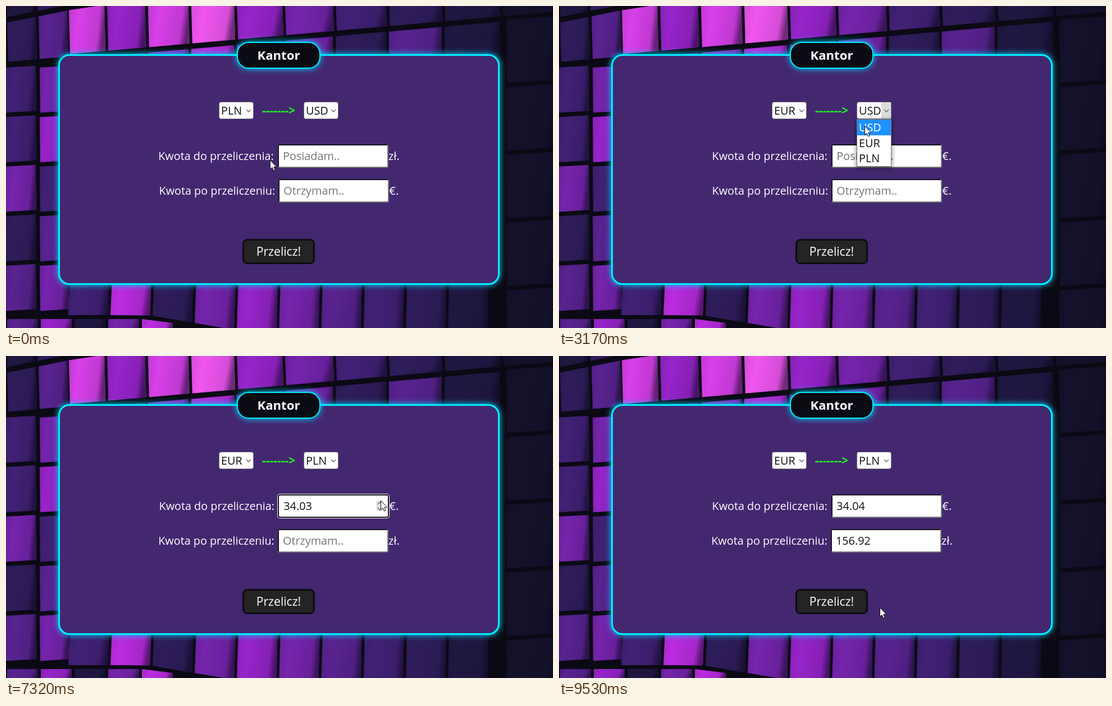
These frames come from a looping animation (974x575 px, 9.89 s). An HTML page:

```html
<!DOCTYPE html>
<html lang="pl">
<head>
<meta charset="utf-8">
<title>Kantor</title>
<style>
  html, body { margin: 0; width: 100%; height: 100%; overflow: hidden; background: #0b0a14; }
  svg { display: block; width: 974px; height: 575px; }
  text { font: 19.8px "Open Sans", "Noto Sans", sans-serif; white-space: pre; }
  .big { font-size: 21.2px; text-anchor: middle; }
  .title { font-size: 22.2px; font-weight: 700; text-anchor: middle; }
  .arrow { font-size: 21px; font-weight: 700; }
  .glow { filter: drop-shadow(0 0 6px #00d8ff); }
  .list { filter: drop-shadow(0 2px 4px #0008); }
</style>
</head>
<body>
<svg viewBox="0 0 974 575">
  <linearGradient id="shade" x2="1" y2=".15">
    <stop offset="0" stop-color="#0a061c" stop-opacity=".12"/>
    <stop offset=".3" stop-color="#0a061c" stop-opacity="0"/>
    <stop offset=".85" stop-color="#0a061c" stop-opacity=".12"/>
    <stop offset="1" stop-color="#0a061c" stop-opacity=".55"/>
  </linearGradient>
  <g id="wall"></g>
  <rect class="glow" x="94.5" y="87.5" width="783" height="409" rx="18.5" fill="#432870" stroke="#00f0ff" stroke-width="3"/>
  <rect class="glow" x="412" y="65" width="147" height="46" rx="20" fill="#0b0b14" stroke="#00f0ff" stroke-width="2"/>
  <text class="title" x="485.5" y="96" fill="#fff">Kantor</text>
  <text class="arrow" x="456" y="194" fill="#1eff1e">-------&gt;</text>
  <g id="form"></g>
</svg>
<script>
const LOOP = 9890;
const wall = document.getElementById('wall');
const form = document.getElementById('form');

// ---------- wall of blocks ----------
// Brightness 0..9: from night blue over violet to pink
function tint(level) {
  const v = level / 9;
  return `hsl(${245 + 55 * v} ${42 + 42 * v}% ${12 + 52 * v}%)`;
}

// A row of blocks, one digit of brightness each, between two slanted lines
function row(levels, edge, top, bottom, lean = 0) {
  return [...levels].map((level, i) => {
    const a = edge(i) + 2, b = edge(i + 1) - 3;
    const points = [a, top(a), b, top(b), b + lean, bottom(b), a + lean, bottom(a)];
    return [tint(level), 'url(#shade)'].map(fill => `<polygon points="${points}" fill="${fill}"/>`).join('');
  }).join('');
}

function column(levels, x0, x1, y0, height) {
  return [...levels].map((level, i) => {
    const y = x => y0 + i * height - .06 * (x - x0);
    return row(level, n => n ? x1 : x0, x => y(x) + 4, x => y(x) + height - 4, 1);
  }).join('');
}

const upper = i => 110 + 66 * i + 2.2 * i * i;
const lower = i => 112 + 75 * i;
const ledge = x => 86 - .088 * (x - 110);
const ground = x => 552 + Math.max(0, x - 256) * .17;

wall.innerHTML =
  row('12', i => 54 * i, () => -2, x => 20 - .2 * x) +
  row('24', i => 56 * i, x => 30 - .2 * x, x => ledge(x) + 4, 2) +
  row('8689653210', upper, x => Math.max(-2, 30 - .2 * x), ledge, 2) +
  row('556765241', upper, x => ledge(x) + 10, () => 130) +
  column('33524', -3, 56, 106, 88.5) +
  column('56345', 58, 114, 106, 88.5) +
  column('00000', 889, 984, 20, 121) +
  row('3725654321', lower, () => 485, ground, -3) +
  row('46157', i => 60 * i, x => ground(x) + 7, () => 580);

// ---------- form parts ----------
const rect = (x, y, w, h, fill, more = '') =>
  `<rect x="${x}" y="${y}" width="${w}" height="${h}" fill="${fill}" ${more}/>`;
const text = (x, y, s, fill, cls = '') => `<text class="${cls}" x="${x}" y="${y}" fill="${fill}">${s}</text>`;
const line = (d, color, w = 1.3) => `<path d="${d}" fill="none" stroke="${color}" stroke-width="${w}"/>`;

const ring = (x, y, w, h) =>
  rect(x - 1, y - 1, w + 2, h + 2, '#fff', 'rx="5"') +
  rect(x + 1, y + 1, w - 2, h - 2, '#fff', 'rx="3" stroke="#0c0c12" stroke-width="2"');

function select(x, value, focus, open) {
  return (focus ? ring(x, 171, 62, 31)
      : rect(x + .5, 171.5, 61, 30, '#fff', 'rx="3.5" stroke="#77737f"')) +
    (open ? rect(x + 44, 172, 17, 29, '#dcdcdc') : '') +
    text(x + 4, 194, value, '#111') +
    line(`M${x + 49} 185l4 4l4 -4`, '#666');
}

function list(x, items, hot) {
  return `<g class="list">${rect(x + .5, 202.5, 61, 84, '#fff', 'stroke="#777"')}</g>` +
    items.map((s, i) =>
      (i === hot ? rect(x + 1, 203 + i * 28, 60, 28, '#1e90ff') : '') +
      text(x + 4, 224 + i * 27.6, s, i === hot ? '#fff' : '#111')).join('');
}

function field(y, label, hint, value, unit, focus, spin) {
  const dx = unit === '€.' ? 1.3 : 0, x = 484 + Math.round(dx);
  return text(271.2 + dx, y + 28, label, '#fff') +
    (focus ? ring(x - 1, y, 198, 42)
      : rect(x, y, 197, 42, '#777', 'rx="3"') +
        line(`M${x + 1} ${y + 40}V${y + 3}q0 -2 2 -2H${x + 195}`, '#1a1820', 2) +
        rect(x + 2, y + 2, 193, 38, '#fff', 'rx="1"')) +
    text(493 + dx, y + 28, value || hint, value ? '#111' : '#757575') +
    (spin ? rect(659, y + 11, 14, 19, '#e4e4e4', 'rx="2"') +
      line(`M662 ${y + 18}l4 -4l4 4M662 ${y + 24}l4 4l4 -4`, '#555') : '') +
    text(681 + dx, y + 28, unit, '#fff');
}

const button = hover =>
  (hover ? rect(420.5, 415.5, 130, 46, 'none', 'rx="9" stroke="#7fb9c8"') : '') +
  rect(422.5, 417.5, 126, 42, '#242424', 'rx="7" stroke="#0c0b12" stroke-width="3"') +
  text(485.5, 446, 'Przelicz!', hover ? '#a9f2ee' : '#fff', 'big');

const pointers = {
  arrow: '<path d="M.5 .5V16.5L4 13.2L6.6 19L9.2 17.9L6.7 12.2H11.6Z" fill="#fff" stroke="#111"/>',
  beam: line('M-3 -7.5H-1L0 -6.5L1 -7.5H3M0 -6.5V6.5M-3 7.5H-1L0 6.5L1 7.5H3', '#111', 1.1),
  hand: '<path d="M-1.5 11V2Q0 -1 1.5 2V7Q4 6 4.5 8Q7 7 7.5 9Q10 8.5 10 11V16L8.5 19V22.5H-.5V20L-5.5 13Q-6 10.5 -4 10.5Z" fill="#fff" stroke="#111"/>' +
    line('M1.5 7V12M4.5 8V12M7.5 9V12', '#111', .9)
};

// ---------- timeline ----------
// Pointer moves: start, end, x, y
const moves = [
  [550, 760, 506, 256], [760, 1180, 424, 191], [1370, 1760, 411, 242], [1960, 2780, 542, 192],
  [3020, 3510, 550, 262], [6035, 6260, 650, 262], [6430, 6600, 667, 258],
  [7520, 8200, 536, 423], [8200, 8470, 528, 429], [9030, 9530, 571, 449]
];

function pointerAt(t) {
  let x = 470, y = 275;
  for (const [from, to, x1, y1] of moves) {
    const k = Math.min(1, Math.max(0, (t - from) / (to - from)));
    x += (x1 - x) * k;
    y += (y1 - y) * k;
  }
  return [Math.round(x), Math.round(y)];
}

// Two typed digits, then four clicks on the spinner
function amountAt(t) {
  const clicks = Math.min(4, Math.floor((t - 6550) / 200));
  return clicks > 0 ? (34 + clicks / 100).toFixed(2) : t >= 5040 ? '34' : t >= 4880 ? '3' : '';
}

function draw(t) {
  const during = (a, b) => t >= a && t < b;
  const [px, py] = pointerAt(t);
  const within = (x, y, w, h) => px >= x && px < x + w && py >= y && py < y + h;

  const openA = during(1230, 1930), openB = during(2880, 3650);
  const open = openA || openB;
  const hot = Math.max(0, Math.min(2, Math.floor((py - 203) / 28)));
  const overA = !open && within(484, 247, 198, 42);
  const overB = !open && within(484, 309, 198, 42);
  const overButton = within(421, 416, 129, 46);
  const focus = during(4080, 8440);

  const from = t < 1930 ? 'PLN' : 'EUR', to = t < 3650 ? 'USD' : 'PLN';
  const amount = amountAt(t), result = t < 8440 ? '' : '156.92';
  const lastKey = t < 4880 ? 4080 : t < 5040 ? 4880 : 5040;
  const caret = during(4080, 6500) && (t - lastKey) % 1060 < 530;

  const kind = overButton ? 'hand' : overB || overA && px < 658 ? 'beam' : 'arrow';

  return select(379, from, during(1930, 2860), openA) +
    select(530, to, during(3650, 4080), openB) +
    field(247, 'Kwota do przeliczenia:', 'Posiadam..', amount, t < 1930 ? 'zł.' : '€.', focus, focus || overA) +
    field(309, 'Kwota po przeliczeniu:', 'Otrzymam..', result, t < 3650 ? '€.' : 'zł.', false, false) +
    (caret ? rect(494 + Math.round(amount.length * 11.3), 256, 1, 23, '#111') : '') +
    button(overButton) +
    (openA ? list(379, ['PLN', 'EUR', 'USD'], hot) : '') +
    (openB ? list(530, ['USD', 'EUR', 'PLN'], hot) : '') +
    `<g transform="translate(${px} ${py})">${pointers[kind]}</g>`;
}

const start = performance.now();
function frame(now) {
  form.innerHTML = draw(Math.max(0, now - start) % LOOP);
  requestAnimationFrame(frame);
}
frame(start);
</script>
</body>
</html>
```
